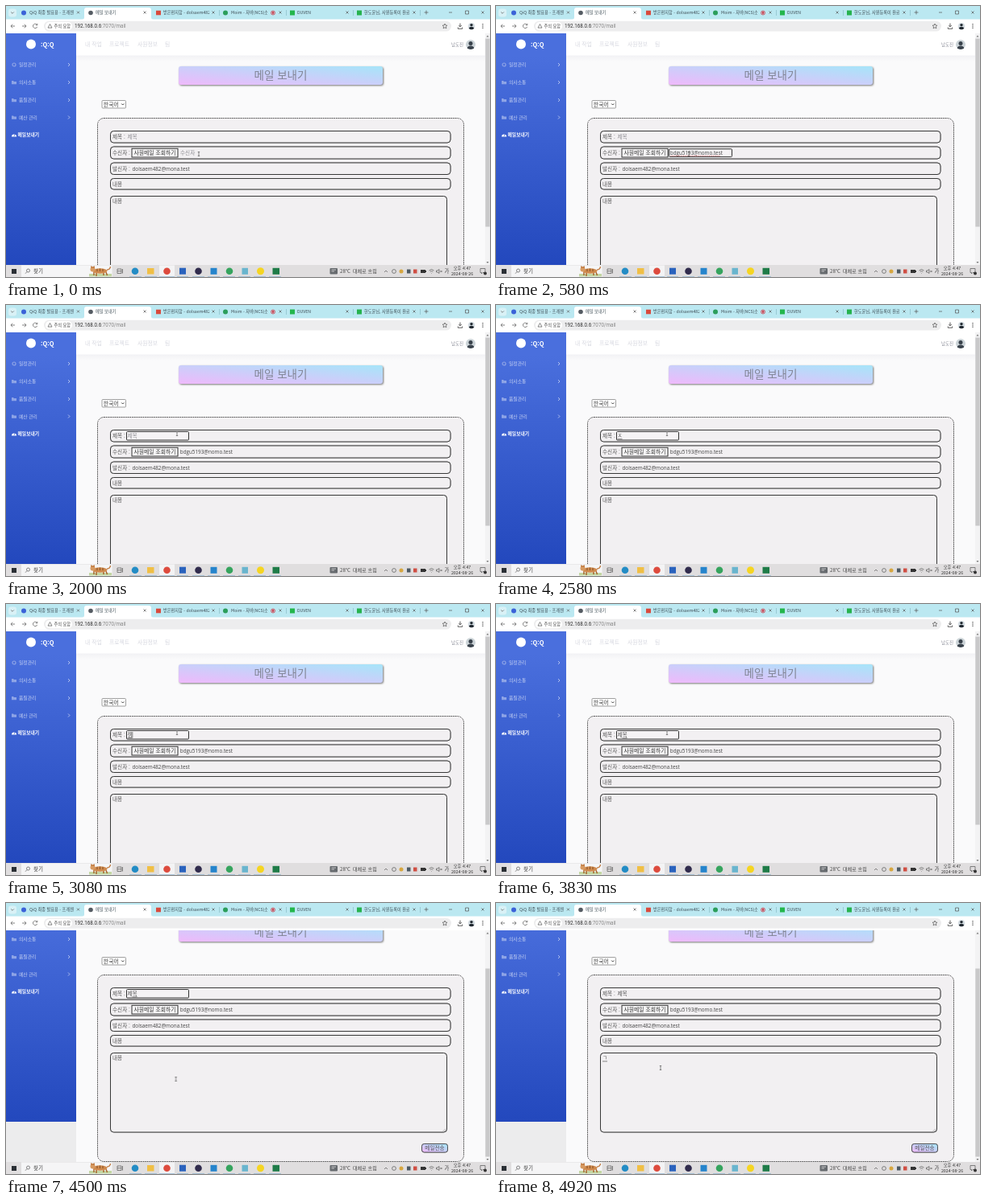
Recreate the animation shown at these times as an HTML page. Size 600 by 337 pixels, loop 5000 ms.

```html
<!DOCTYPE html>
<html lang="ko">
<head>
<meta charset="utf-8">
<title>메일 보내기</title>
<style>
html, body { margin: 0; width: 100%; height: 100%; overflow: hidden; background: #fff; }
svg { display: block; width: 100vw; height: 100vh; }
text { font: 6.5px "Noto Sans CJK KR", "Noto Sans CJK", "Noto Sans", sans-serif; fill: #444; }
.tabs text { font-size: 5.2px; fill: #3d4c54; }
.side text { font-size: 5.8px; fill: #c8d3f3; }
.side .brand { font-size: 7.5px; font-weight: 700; fill: #fff; }
.side .now { font-weight: 700; fill: #fff; }
.nav text { font-size: 6.8px; fill: #d6d7df; }
.form text { font-size: 6.6px; fill: #555; }
.form text.mail { font: 6.3px "Open Sans", "Noto Sans", sans-serif; fill: #444; }
.form text.hint { fill: #8d8d92; }
.clock text { font-size: 5.3px; text-anchor: middle; fill: #333; }
.line { fill: none; stroke: #555; stroke-width: .7; }
.row { fill: #f2f0f2; stroke: #333; stroke-width: .95; }
.focus { fill: #f5f3f5; stroke: #333; stroke-width: 1; }
.caret { stroke: #333; stroke-width: .6; animation: blink 1s step-end infinite; }
.drop { filter: drop-shadow(.7px .7px .5px #0007); }

.scroll { animation: scroll 5s linear infinite; }
.thumb { animation: thumb 5s linear infinite; }
.mouse { animation: mouse 5s ease-in-out infinite; }
.step { animation: 5s step-end infinite; }

@keyframes scroll {
  0%, 83% { transform: none; }
  86.6% { transform: translateY(-24px); }
  90%, 100% { transform: translateY(-50px); }
}
@keyframes thumb {
  0%, 83% { transform: none; }
  86.6% { transform: translateY(20px); }
  90%, 100% { transform: translateY(41px); }
}
@keyframes mouse {
  0%, 14% { transform: translate(239px, 184px); }
  23%, 78% { transform: translate(212px, 160px); }
  85%, 88% { transform: translate(214px, 226px); }
  93%, 100% { transform: translate(204px, 205px); }
}
@keyframes blink { 50% { opacity: 0; } }
@keyframes arrow { 0% { opacity: 0; } 80% { opacity: 1; } 89%, 100% { opacity: 0; } }
@keyframes beam { 0% { opacity: 1; } 80% { opacity: 0; } 89%, 100% { opacity: 1; } }
@keyframes toHint { 0% { opacity: 1; } 11.6%, 100% { opacity: 0; } }
@keyframes toFocus { 0% { opacity: 0; } 6.6% { opacity: 1; } 35%, 100% { opacity: 0; } }
@keyframes toMail { 0% { opacity: 0; } 11.6%, 100% { opacity: 1; } }
@keyframes toSpell { 0% { opacity: 0; } 11.6% { opacity: 1; } 35%, 100% { opacity: 0; } }
@keyframes subFocus { 0% { opacity: 0; } 35% { opacity: 1; } 92%, 100% { opacity: 0; } }
@keyframes subHint { 0% { opacity: 1; } 50%, 100% { opacity: 0; } }
@keyframes key1 { 0% { opacity: 0; } 50% { opacity: 1; } 55%, 100% { opacity: 0; } }
@keyframes key2 { 0% { opacity: 0; } 55% { opacity: 1; } 60%, 100% { opacity: 0; } }
@keyframes key3 { 0% { opacity: 0; } 60% { opacity: 1; } 66.6%, 100% { opacity: 0; } }
@keyframes key4 { 0% { opacity: 0; } 66.6% { opacity: 1; } 71.6%, 100% { opacity: 0; } }
@keyframes key5 { 0% { opacity: 0; } 71.6%, 100% { opacity: 1; } }
@keyframes under1 { 0% { opacity: 0; } 50% { opacity: 1; } 66.6%, 100% { opacity: 0; } }
@keyframes under2 { 0% { opacity: 0; } 66.6% { opacity: 1; } 92%, 100% { opacity: 0; } }
@keyframes bodyHint { 0% { opacity: 1; } 96.6%, 100% { opacity: 0; } }
@keyframes bodyKey { 0% { opacity: 0; } 96.6%, 100% { opacity: 1; } }
</style>
</head>
<body>
<svg viewBox="0 0 600 337" preserveAspectRatio="none">
<defs>
  <linearGradient id="blue" x2="0" y2="1"><stop offset=".1" stop-color="#4a6fdd"/><stop offset="1" stop-color="#2348bd"/></linearGradient>
  <linearGradient id="candy" y1="1" x2="1" y2="0"><stop stop-color="#efb9fb"/><stop offset="1" stop-color="#a6e5f9"/></linearGradient>
  <linearGradient id="shade" x2="0" y2="1"><stop stop-color="#f1f1f4"/><stop offset="1" stop-color="#fafafb"/></linearGradient>
  <clipPath id="view"><path d="M0 34h594v288H0z"/></clipPath>
  <clipPath id="face"><circle cx="576" cy="48" r="6"/></clipPath>
  <clipPath id="t1"><path d="M28 0h56v16H28z"/></clipPath>
  <clipPath id="t3"><path d="M194 0h58v16h-58z"/></clipPath>
  <clipPath id="t4"><path d="M278 0h46v16h-46z"/></clipPath>
  <clipPath id="t6"><path d="M443 0h57v16h-57z"/></clipPath>
  <path id="x" d="M-1.5-1.5l3 3m0-3l-3 3" class="line"/>
  <path id="next" d="M-1-2l2 2-2 2" fill="none" stroke="#c8d3f3" stroke-width=".8"/>
  <path id="folder" d="M-3-2h2l1 1h3v3.3h-6z" fill="#8ea4e6"/>
</defs>

<!-- page -->
<g clip-path="url(#view)">
  <path d="M0 34h594v288H0z" fill="#fafafb"/>
  <path d="M0 34h87v288H0z" fill="#ececed"/>
  <g class="scroll">
    <path d="M0 34h87v288H0z" fill="url(#blue)"/>
    <g class="side">
      <circle cx="31" cy="47.5" r="6" fill="#fff"/>
      <text class="brand" x="43" y="50.5">:Q:Q</text>
      <circle cx="10" cy="73" r="2" fill="none" stroke="#8ea4e6" stroke-width="1.2"/>
      <use href="#folder" x="10" y="95"/><use href="#folder" x="10" y="117"/><use href="#folder" x="10" y="138.500"/>
      <text x="16" y="75">일정관리</text><use href="#next" x="78" y="73"/>
      <text x="16" y="97">의사소통</text><use href="#next" x="78" y="95"/>
      <text x="16" y="118.8">품질관리</text><use href="#next" x="78" y="117"/>
      <text x="16" y="140.5">예산 관리</text><use href="#next" x="78" y="138.500"/>
      <path d="M7 162.5a3 3 0 1 1 6 0z" fill="#fff"/><path d="M10 162l1.3-3" stroke="#3157c9" stroke-width=".7"/>
      <text class="now" x="14.5" y="162.3">메일보내기</text>
    </g>

    <path d="M87 61h507v8H87z" fill="url(#shade)"/>
    <path d="M87 34h507v27.500H87z" fill="#fff"/>
    <g class="nav">
      <text x="98" y="49.7">내 작업</text><text x="128" y="49.7">프로젝트</text>
      <text x="163" y="49.7">사원정보</text><text x="197" y="49.7">팀</text>
      <text x="552" y="50" style="font-size:5.5px;fill:#888a96">남도진</text>
    </g>
    <g clip-path="url(#face)">
      <path d="M569 41h14v14h-14z" fill="#ccd4d8"/>
      <circle cx="576" cy="46.5" r="2.5" fill="#39424b"/><ellipse cx="576" cy="54" rx="4.800" ry="4.500" fill="#39424b"/>
    </g>

    <rect x="214" y="75" width="253" height="23" rx="3" fill="url(#candy)" style="filter:drop-shadow(1.2px 1.2px 1.2px #0008)"/>
    <text x="340.5" y="90.8" text-anchor="middle" style="font-size:13.5px;fill:#808494">메일 보내기</text>

    <rect x="119" y="117.5" width="29.5" height="9.5" rx="1" fill="#fff" stroke="#888" stroke-width=".8"/>
    <text x="120.8" y="124.8" style="font-size:6.9px">한국어</text>
    <path d="M143.2 121.5l1.5 1.5 1.5-1.500" class="line" style="stroke:#222;stroke-width:.9"/>

    <rect x="113.5" y="139.5" width="454" height="232" rx="8" fill="#f2f0f2" stroke="#333" stroke-width="1" stroke-dasharray="1.3 1"/>
    <g class="form">
      <g class="drop">
        <rect class="row" x="129.5" y="155.5" width="421.5" height="14.5" rx="4"/>
        <rect class="row" x="129.5" y="175" width="421.5" height="15" rx="4"/>
        <rect class="row" x="129.5" y="195" width="421.5" height="14.5" rx="4"/>
        <rect class="row" x="129.5" y="214.5" width="421.5" height="13.5" rx="4"/>
        <rect class="row" x="129.5" y="236.5" width="417" height="98.5" rx="4"/>
      </g>

      <text x="132" y="164.7">제목 :</text>
      <rect class="focus step" x="149.5" y="157.5" width="77" height="10.5" rx="1" style="animation-name:subFocus"/>
      <text class="hint step" x="150.5" y="164.9" style="animation-name:subHint">제목</text>
      <text class="step" x="150.5" y="164.9" style="animation-name:key1">ㅈ</text>
      <text class="step" x="150.5" y="164.9" style="animation-name:key2">제</text>
      <text class="step" x="150.5" y="164.9" style="animation-name:key3">젬</text>
      <text class="step" x="150.5" y="164.9" style="animation-name:key4">제모</text>
      <text class="step" x="150.5" y="164.9" style="animation-name:key5">제목</text>
      <g class="step" style="animation-name:under1">
        <path class="line" d="M150.5 166.700h6"/><path class="caret" d="M156.800 159v7.500"/>
      </g>
      <g class="step" style="animation-name:under2">
        <path class="line" d="M156.600 166.700h6"/><path class="caret" d="M162.900 159v7.500"/>
      </g>

      <text x="132" y="184.8">수신자 :</text>
      <rect x="156" y="177.3" width="57" height="10.7" fill="#f6f5f6" stroke="#333" stroke-width="1"/>
      <text x="158.5" y="184.9" style="font-size:6.8px;fill:#333">사원메일 조회하기</text>
      <rect class="focus step" x="214.5" y="177.8" width="78" height="9.8" rx="1" style="animation-name:toFocus"/>
      <text class="hint step" x="216" y="184.9" style="animation-name:toHint">수신자</text>
      <text class="mail step" x="215.8" y="184.8" style="animation-name:toMail">bdgu5193@nomo.test</text>
      <path class="step" d="M216 186.3h62" fill="none" stroke="#e04b4b" stroke-width=".7" stroke-dasharray="1 .6" style="animation-name:toSpell"/>

      <text x="132" y="204.6">발신자 :</text>
      <text class="mail" x="156.5" y="204.6">dolsaem482@mona.test</text>
      <text x="132" y="223.5">내용</text>

      <text class="step" x="132" y="245.2" style="animation-name:bodyHint">내용</text>
      <g class="step" style="animation-name:bodyKey">
        <text x="132" y="245.2">ㄱ</text>
        <path class="line" d="M132 246.9h6"/><path class="caret" d="M138.3 239.5v7"/>
      </g>
      <path d="M541.5 334l3.5-3.5M543.5 334l1.5-1.5" stroke="#888" stroke-width=".5"/>

      <rect class="drop" x="515.5" y="349.5" width="32" height="10.5" rx="3" fill="url(#candy)" stroke="#444" stroke-width=".9"/>
      <text x="531.5" y="357.1" text-anchor="middle">메일전송</text>
    </g>
  </g>
</g>

<!-- scrollbar -->
<path d="M594 34h6v288h-6z" fill="#f3f3f4"/>
<path d="M595.5 38.500l1.500-2 1.500 2zM595.500 318l1.500 2 1.500-2z" fill="#777"/>
<path class="thumb" d="M594.300 40.500h5.400v234h-5.400z" fill="#c9c9ca"/>

<!-- browser -->
<path d="M0 0h600v17H0z" fill="#bbe8f1"/>
<path d="M0 16.5h600v17.500H0z" fill="#fff"/>
<path d="M94 17q3 0 3-3V5q0-3 3-3h77q3 0 3 3v9q0 3 3 3z" fill="#fff"/>
<g class="tabs">
  <rect x="3" y="3.5" width="10" height="10" rx="3" fill="#d9f1f6"/><path d="M6.200 7.500l1.800 1.800 1.800-1.800" class="line"/>
  <circle cx="22" cy="8.5" r="3" fill="#3b62d8"/>
  <text x="29" y="10.3" clip-path="url(#t1)">QiQ 최종 발표용 - 프레젠테이션</text>
  <circle cx="105" cy="8.5" r="2.8" fill="#555c63"/>
  <text x="111" y="10.3">메일 보내기</text>
  <path d="M186 5.700h6v5.600h-6z" fill="#d94a3d"/>
  <text x="195" y="10.3" clip-path="url(#t3)">받은편지함 - dolsaem482@mona</text>
  <circle cx="272" cy="8.5" r="3" fill="#2b9e5b"/>
  <text x="279" y="10.3" clip-path="url(#t4)">Moim - 자바(NCS)소프트</text>
  <circle cx="331" cy="8.5" r="2.5" fill="none" stroke="#cf3b4a" stroke-width=".8"/><circle cx="331" cy="8.5" r="1.4" fill="#cf3b4a"/>
  <path d="M352 5.500h6v6h-6z" fill="#24b64c"/>
  <text x="361" y="10.3">DUVEN</text>
  <path d="M435 5.500h6v6h-6z" fill="#27b34f"/>
  <text x="444" y="10.3" clip-path="url(#t6)">한도윤님, 사원등록이 완료되었</text>
  <use href="#x" x="89.500" y="8"/><use href="#x" x="172" y="8"/><use href="#x" x="257" y="8"/>
  <use href="#x" x="340" y="8"/><use href="#x" x="423" y="8"/><use href="#x" x="506" y="8"/>
  <path d="M264.5 5v7M347.5 5v7M430.5 5v7M513.5 5v7" stroke="#83b6c2" stroke-width=".6"/>
  <path d="M518.5 8h5m-2.500-2.500v5M549 8h4M569.500 6h4v4h-4z" class="line"/><use href="#x" x="591" y="8"/>
</g>
<path d="M11 25H6m2.200-2.300L6 25l2.200 2.300M20 25h5m-2.200-2.300L25 25l-2.200 2.300" class="line"/>
<path d="M38.500 23.500a2.700 2.700 0 1 0 .2 2.400M38.800 21.800v2h-2" class="line"/>
<rect x="47" y="18.700" width="505" height="12.800" rx="6.400" fill="#ededee"/>
<rect x="49" y="20" width="33" height="10.200" rx="5" fill="#fff"/>
<path d="M54.500 22.500l2.500 4.600h-5z" class="line"/>
<text x="59.500" y="27" style="font-size:5.2px">주의 요함</text>
<text x="85" y="27.200" style="font:6.300px Roboto,sans-serif;fill:#333">192.168.0.6<tspan fill="#888">:7070/mail</tspan></text>
<path d="M544 22l.9 2 2.100.2-1.600 1.500.5 2.200-1.900-1.200-1.900 1.200.5-2.200-1.600-1.500 2.100-.2z" class="line"/>
<path d="M563 21.500v4.200m-1.800-1.700l1.800 1.800 1.800-1.800M560.300 26.500v1.800h5.400v-1.800" class="line" style="stroke:#222"/>
<circle cx="577" cy="25" r="4.300" fill="#d5dde2"/><circle cx="577" cy="23.600" r="1.700" fill="#202830"/><path d="M573.700 27.800a3.500 3 0 0 1 6.600 0 4.300 4.300 0 0 1-6.600 0z" fill="#202830"/>
<g fill="#444"><circle cx="591" cy="22.700" r=".7"/><circle cx="591" cy="25" r=".7"/><circle cx="591" cy="27.300" r=".7"/></g>

<!-- taskbar -->
<path d="M0 322h600v15H0z" fill="#e0dedf"/>
<path d="M19 322.500h112.500V337H19z" fill="#f5f5f6"/>
<path d="M7 327h6v6H7z" fill="#2b3035"/>
<circle cx="27.500" cy="329" r="2" class="line"/><path d="M26 330.500l-2 2.200" class="line"/>
<text x="34" y="332.200">찾기</text>
<path d="M103 333h28v3.500h-28z" fill="#c3d6a3"/>
<path d="M125 328q4 0 4.500-4" fill="none" stroke="#bf793f" stroke-width="1.400"/>
<path d="M109 331v4m3-3v4m9-5v4m3-4l1.500 4" stroke="#a9642f" stroke-width="1.500"/>
<ellipse cx="116.500" cy="329.500" rx="9" ry="3.300" fill="#cf8a4d"/><circle cx="107.500" cy="327.500" r="3" fill="#d79a61"/>
<path d="M105 325.500l.5-2.500 2 1.500 2-1.500.6 2.800z" fill="#bf793f"/><path d="M113 327v3m3.500-3.500v3.500m3.500-3v3" stroke="#7d4925" stroke-width=".9"/>
<path d="M138 327h5v5.500h-5zM144.500 327v5.500M138 329.700h5" class="line"/>
<path d="M190 322.500h19V337h-19z" fill="#f3f3f4"/>
<circle cx="160" cy="329.800" r="4.300" fill="#238cc5"/>
<path d="M175 326h8.500v7.500H175z" fill="#f0bf45"/>
<circle cx="199.500" cy="329.800" r="4.300" fill="#dd4b3e"/>
<path d="M215 325.700h8v8h-8z" fill="#2a62bd"/>
<circle cx="238.500" cy="329.800" r="4.300" fill="#302b4d"/>
<path d="M253.500 325.800h8v8h-8z" fill="#2584cc"/>
<circle cx="277" cy="329.800" r="4.300" fill="#36a45e"/>
<path d="M292.500 325.800h7.500v8h-7.500z" fill="#69b5ce"/>
<circle cx="315.500" cy="329.800" r="4.500" fill="#f5d522"/>
<path d="M330.500 325.800h8.500v8h-8.500z" fill="#1f7c48"/>
<path d="M153 336.500h15m4 0h15m3 0h19m3 0h14m5 0h15m4 0h15m4 0h15m4 0h15m4 0h15m4 0h15" stroke="#8fb4d0" stroke-width=".7"/>
<rect x="401.500" y="326" width="9.500" height="7.500" rx="1" fill="#666a6e"/><path d="M403.500 328h5.500m-5.500 2h3.500" stroke="#e0dedf" stroke-width=".8"/>
<text x="414" y="332.100" style="font-size:6.100px">28°C</text><text x="430" y="332.100" style="font-size:6.100px">대체로 흐림</text>
<path d="M469 331l2-2 2 2" class="line"/>
<circle cx="481" cy="330" r="2.400" class="line"/>
<circle cx="490" cy="330" r="2.500" fill="#d7a741"/>
<path d="M497 327.500h4.500v5H497z" fill="#4c5963"/><path d="M505 327.500h4.500v5H505z" fill="#cf4e43"/>
<path d="M514 328h6v4h-6zM520 329h1v2h-1z" fill="#333"/>
<path d="M524.500 329q3-3 6 0m-4.800 1.500q1.800-1.700 3.600 0m-1.800 1.500v.5M533.500 329h1.500l2-1.500v5l-2-1.500h-1.500zM538.500 329l2 2m0-2l-2 2" class="line"/>
<text x="543.500" y="332.200" style="font-size:6.300px">가</text>
<g class="clock"><text x="565.500" y="328.200">오후 4:47</text><text x="565.500" y="335.200">2024-08-26</text></g>
<path d="M588 326.500h6v5h-3l-1.500 1.500v-1.500H588z" class="line"/><circle cx="594" cy="332.500" r="2" fill="#333"/>

<!-- pointer -->
<g class="mouse">
  <path class="step line" d="M-1.200-2.500h2.400M0-2.500v5M-1.200 2.500h2.400" style="animation-name:beam"/>
  <path class="step" d="M-.5-3v5.500l1.300-1.200 1 2 .9-.4-.9-2h1.700z" fill="#fff" stroke="#444" stroke-width=".6" style="animation-name:arrow"/>
</g>
</svg>
</body>
</html>
```
